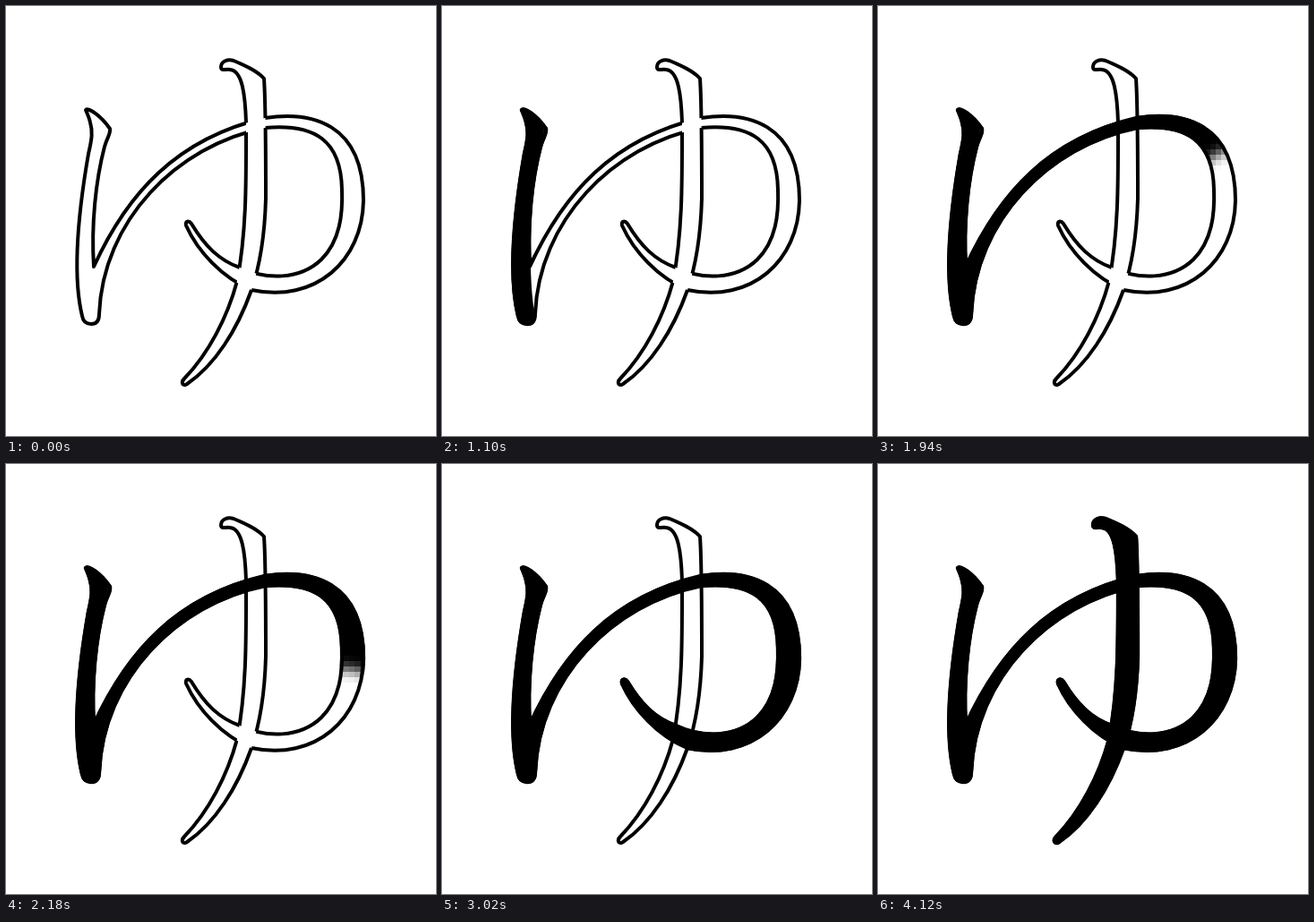
An HTML page with a canvas for the animation above (4.79 s loop, 480 by 480 pixels).

```html
<!DOCTYPE html>
<html lang="ja">
<head>
<meta charset="utf-8">
<style>
html, body { margin: 0; height: 100%; overflow: hidden; background: #fff }
canvas { display: block }
</style>
</head>
<body>
<canvas id="stage" width="480" height="480"></canvas>
<script>
const LOOP = 4790, STEP = 60, CELL = 6;

const loopShape = 'M89 116C91 113 105 121 116 137C117 143 113 146 110 157C100 195 95 245 98 291' +
  'C135 210 190 148 289 125C340 117 399 130 399 217C398 285 345 332 274 317' +
  'C241 303 214 274 201 245C200 240 204 239 207 243C222 268 238 284 261 292' +
  'C290 306 328 306 352 283C373 262 376 232 375 205C374 150 345 131 289 136' +
  'C190 156 108 240 104 344C104 352 100 355 95 355C89 355 86 352 85 346' +
  'C75 305 79 240 92 165C96 148 97 140 94 130C93 125 91 121 89 116Z';
const stemShape = 'M240 68C240 62 247 59 254 61C266 66 280 72 288 81C290 110 290 160 290 215' +
  'C289 250 284 288 274 317C258 362 233 401 202 422C197 425 195 420 199 416' +
  'C226 388 247 348 258 307C269 250 268 190 268 130C267 100 264 72 250 71C245 70 240 73 240 68Z';
const downRegion = new Path2D('M0 0H130V150L99 292Q100 328 104 345V480H0Z');

// Brush paths: each piece ends at the given step.
const loop = makeStroke(loopShape, 800, 'M98 96', [
  [0, 'L99 118'],
  [5, 'C102 170 88 240 90 364'],
  [8, 'L98 352C100 320 106 290 114 268'],
  [14, 'C150 190 215 145 304 129'],
  [17, 'C322 127 342 132 355 143'],
  [23, 'C380 160 397 205 386 228'],
  [26, 'C384 250 382 275 366 291'],
  [35, 'C335 318 290 316 260 299C240 288 228 275 218 263'],
  [37, 'L190 222']
]);
const stem = makeStroke(stemShape, 3820, 'M225 66', [
  [0, 'L241 66'],
  [5, 'C275 66 278 90 279 130V210C278 290 255 365 190 440']
]);

function makeStroke(shape, start, d, pieces) {
  const probe = document.createElementNS('http://www.w3.org/2000/svg', 'path');
  const keys = pieces.map(([step, piece]) => {
    probe.setAttribute('d', d += piece);
    return [step, probe.getTotalLength()];
  });
  const outside = new Path2D(shape);
  outside.rect(0, 0, 480, 480);
  return { shape: new Path2D(shape), outside, brush: new Path2D(d), start, keys, last: keys.at(-1)[0] };
}

function makeContext(size) {
  const canvas = document.createElement('canvas');
  canvas.width = canvas.height = size;
  return canvas.getContext('2d');
}

const ctx = document.getElementById('stage').getContext('2d');
const layer = makeContext(480), mask = makeContext(81);
ctx.lineJoin = layer.lineJoin = mask.lineJoin = 'round';
layer.imageSmoothingEnabled = false;

function brushLength(keys, step) {
  const i = Math.max(1, keys.findIndex(key => key[0] >= step));
  const [s0, l0] = keys[i - 1], [s1, l1] = keys[i];
  return l0 + (l1 - l0) * (step - s0) / (s1 - s0);
}

function solid(c, shape, width) {
  c.lineWidth = width;
  c.fill(shape);
  c.stroke(shape);
}

function outline(a, b) {
  ctx.save();
  ctx.clip(b.outside, 'evenodd');
  ctx.lineWidth = 4;
  ctx.stroke(a.shape);
  ctx.restore();
}

// Reveal the shape behind a coarse, soft-edged brush mask.
function paint(stroke, t) {
  const step = Math.floor((t - stroke.start) / STEP);
  if (step < 0) return;
  if (step >= stroke.last) return solid(ctx, stroke.shape, 4.4);

  mask.clearRect(0, 0, 81, 81);
  mask.save();
  mask.filter = 'blur(0.8px)';
  mask.setTransform(1 / CELL, 0, 0, 1 / CELL, 1 / CELL, 2 / CELL);
  mask.lineWidth = 54;
  mask.setLineDash([brushLength(stroke.keys, step), 9999]);
  mask.stroke(stroke.brush);
  mask.restore();

  layer.clearRect(0, 0, 480, 480);
  layer.save();
  if (stroke === loop && step <= 5) layer.clip(downRegion);
  solid(layer, stroke.shape, 4.4);
  layer.globalCompositeOperation = 'destination-in';
  layer.drawImage(mask.canvas, -1, -2, 81 * CELL, 81 * CELL);
  layer.restore();
  ctx.drawImage(layer.canvas, 0, 0);
}

function draw() {
  const t = performance.now() % LOOP;
  ctx.clearRect(0, 0, 480, 480);
  outline(loop, stem);
  outline(stem, loop);
  paint(loop, t);
  paint(stem, t);
  requestAnimationFrame(draw);
}
draw();
</script>
</body>
</html>
```
